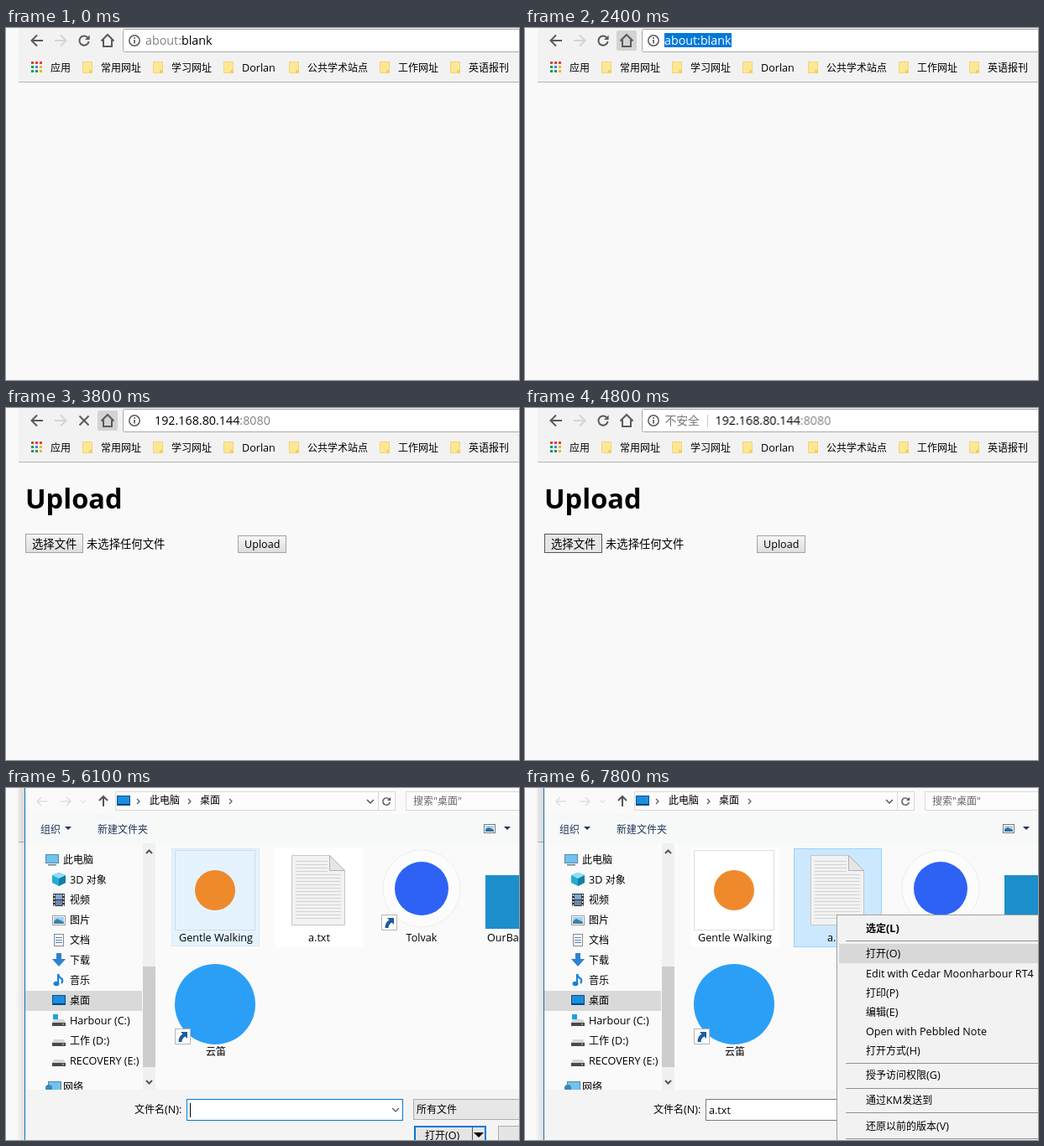
An HTML page for the animation above (8000 ms loop, 611x420 px).

```html
<!DOCTYPE html>
<html lang="zh">
<head>
<meta charset="utf-8">
<title>Upload</title>
<style>
html, body { margin: 0; width: 100%; height: 100%; overflow: hidden; background: #f9f9f9; }
svg { display: block; }
text { font-family: "Open Sans", "Noto Sans CJK SC", "Noto Sans CJK", sans-serif; white-space: pre; }
</style>
</head>
<body>
<script>
const LOOP = 8000, BLUE = '#0078d7';

// Drawing helpers, each returns SVG markup
const rect = (x, y, w, h, fill, more = '') =>
  `<rect x="${x}" y="${y}" width="${w}" height="${h}" fill="${fill}" ${more}/>`;
const box = (x, y, w, h, fill, line, more = '') =>
  rect(x + .5, y + .5, w - 1, h - 1, fill, `stroke="${line}" ${more}`);
const line = (d, color, width = 1, more = '') =>
  `<path d="${d}" fill="none" stroke="${color}" stroke-width="${width}" ${more}/>`;
const shape = (d, fill, more = '') => `<path d="${d}" fill="${fill}" ${more}/>`;
const disc = (x, y, r, fill, more = '') => `<circle cx="${x}" cy="${y}" r="${r}" fill="${fill}" ${more}/>`;
const group = (id, ...parts) => `<g id="${id}">${parts.join('')}</g>`;
// Latin runs are set slightly larger than the Chinese glyphs around them
const text = (x, y, str, size = 12, fill = '#000', more = '') =>
  `<text x="${x}" y="${y}" font-size="${size}" fill="${fill}" ${more}>` +
  str.replace(/[ -~]+/g, s => `<tspan font-size="${size * 1.05}">${s}</tspan>`) + '</text>';
const mid = 'text-anchor="middle"';
const chevron = (x, y, color, s = 4, w = 1.5) => line(`M${x - s} ${y - s / 2}l${s} ${s}l${s} ${-s}`, color, w);
const angle = (x, y) => line(`M${x - 2} ${y - 3}l3 3l-3 3`, '#555', 1.2);
const caretDown = (x, y, color = '#1e395b', s = 4) => shape(`M${x - s} ${y - s / 2}h${s * 2}l${-s} ${s}z`, color);

function arrow(x, color) {
  return line(`M${x + 7} 15h-13M${x} 8.500l-6.500 6.500l6.500 6.500`, color, 2);
}

function reload(x, y, r, color, w) {
  return line(`M${x + r * .75} ${y - r * .66}A${r} ${r} 0 1 0 ${x + r} ${y + 1}`, color, w) +
    shape(`M${x + r + 1} ${y - r - 1}v${r}h${-r}z`, color);
}

function browser() {
  const folders = [[91, '常用网址'], [175, '学习网址'], [259, 'Dorlan'],
    [337, '公共学术站点'], [445, '工作网址'], [529, '英语报刊']];
  const dots = ['#db4437', '#db4437', '#db4437', '#0f9d58', '#4285f4', '#f4b400', '#0f9d58', '#0f9d58', '#f4b400'];
  return rect(15, 0, 596, 64, '#f2f2f2') + rect(15, 64, 596, 1, '#b4b4b4') +
    group('homeHover', rect(109, 3, 24, 24, '#d3d3d3', 'rx="2"')) +
    arrow(37, '#5a5a5a') + `<g transform="matrix(-1 0 0 1 130 0)">${arrow(65, '#d4d4d4')}</g>` +
    group('reload', reload(93, 15, 5.6, '#5a5a5a', 2)) +
    group('stop', line('M87.500 9.500l11 11m0-11l-11 11', '#5a5a5a', 2)) +
    line('M113.500 15.500L121 8l7.500 7.500M116 14v8h10v-8', '#5a5a5a', 2) +
    box(139, 1, 500, 28, '#fff', '#aaa', 'rx="2"') +
    disc(153, 15, 6.2, 'none', 'stroke="#5a5a5a" stroke-width="1.500"') +
    rect(152.2, 14, 1.7, 4.5, '#5a5a5a') + rect(152.2, 11, 1.7, 1.8, '#5a5a5a') +
    dots.map((c, i) => rect(30 + i % 3 * 5, 40 + (i / 3 | 0) * 5, 3, 3, c)).join('') +
    text(53, 52, '应用') +
    folders.map(([x, name]) => box(x, 40, 12, 14, '#fee794', '#f3d477') +
      rect(x + 8, 50, 4, 4, '#f3cf63') + text(x + 22, 52, name)).join('');
}

const page = () =>
  text(23, 120, 'Upload', 31, '#000', 'font-weight="700"') +
  box(23, 150, 69, 23, 'url(#button)', '#a3a3a3') +
  group('pressed', box(23, 150, 69, 23, '#e6e6e6', '#555')) +
  text(31, 167, '选择文件', 13.33) + text(96, 167, '未选择任何文件', 13.33) +
  box(276, 152, 58, 21, 'url(#button)', '#a3a3a3') + text(284, 167, 'Upload');

function suggestions() {
  const host = '192.168.80.144:8080';
  const rows = [[host, ''], [host + '/abc', ' - Error'], [host + '/index', ' - todo list'],
    [host + '/todos', ' - todo list'], ['192.168.80.144', ' - 网页搜索']];
  const sheet = y => box(149, y - 6, 9, 12, '#fff', '#777');
  const lens = y => disc(152, y - 1, 3.5, 'none', 'stroke="#777" stroke-width="1.500"') + line(`M154.500 ${y + 1.5}l4 4`, '#777', 2);
  return rect(15, 168, 596, 9, 'url(#shadow)') + rect(15, 29, 596, 139, '#fff') +
    rect(15, 37, 596, 24, '#e8e8e8') + rect(15, 167, 596, 1, '#bbb') +
    rows.map(([link, title], i) => {
      const y = 49 + i * 24;
      return (i < 4 ? sheet : lens)(y) +
        `<text x="166" y="${y + 5}" font-size="14.300" fill="#3367d6">${link}<tspan fill="#777">${title}</tspan></text>`;
    }).join('');
}

function address() {
  const host = '192.168.80.144<tspan fill="#808080">:8080</tspan>';
  const url = `<text x="166" y="20" font-size="14.300">${host}</text>`;
  const typed = (str, rest, x) => rect(x, 6, 304 - x, 17, BLUE) + text(166, 20, str, 13.6) +
    text(x, 20, rest, 13.6, '#fff');
  return group('blank', '<text x="166" y="20" font-size="14.300"><tspan fill="#808080">about:</tspan>blank</text>') +
    group('caret', rect(246, 5, 1, 18, '#000')) +
    group('selected', rect(166, 6, 80, 17, BLUE), text(166, 20, 'about:blank', 13.6, '#fff')) +
    group('typeOne', typed('1', '92.168.80.144:8080', 174)) +
    group('typeTwo', typed('19', '2.168.80.144:8080', 182)) +
    group('chip', text(166.5, 20, '不安全', 13.8, '#777'), rect(217, 8, 1, 15, '#ccc')) +
    group('url', url);
}

function scrollbar(x, top, bottom, from, to) {
  return rect(x, top, 15, bottom - top, '#f0f0f0') + rect(x, from, 15, to - from, '#cdcdcd') +
    line(`M${x + 4} ${top + 12}l3.500-3.500l3.500 3.500M${x + 4} ${bottom - 11}l3.500 3.500l3.500-3.500`, '#555', 2);
}

const opening = () =>
  rect(28, 0, 583, 420, '#fff') + rect(28, 357, 583, 63, '#f6f7f5') + rect(27, 0, 1, 420, '#35647f') +
  scrollbar(166, 66, 357, 84, 279) + rect(156, 371, 56, 18, '#fff') + rect(217, 367, 254, 27, '#fff') +
  rect(481, 367, 130, 27, '#fff') + rect(481, 399, 90, 21, '#fff') + rect(580, 399, 31, 21, '#fff');

const screen = (x, y) => box(x, y, 16, 11, '#6fc3ef', '#5c87a3') + rect(x + 3, y + 12, 10, 1.5, '#6c7a84');

function navPane() {
  const drive = y => shape(`M57 ${y - 1}h12l2 4h-16z`, '#d6d6d6') + rect(55, y + 3, 16, 4, '#4b4b4b') +
    rect(67, y + 4, 2, 1.5, '#5fd35f');
  const sheet = (x, y) => box(x, y, 12, 15, '#fff', '#888') +
    line(`M${x + 2} ${y + 4.5}h8m-8 3h8m-8 3h8`, '#4b84b8');
  const icons = [
    y => shape(`M63 ${y - 8}l8 3v9l-8 4l-8-4v-9z`, '#25acd3') + shape(`M63 ${y - 1}l8-4v9l-8 4z`, '#157ea8') +
      shape(`M63 ${y - 8}l8 3l-8 4l-8-4z`, '#8be0f2'),
    y => rect(56, y - 7, 14, 15, '#333') + rect(59, y - 6, 8, 6, '#7fa7cf') + rect(59, y + 1, 8, 6, '#6c86b0') +
      line(`M57.500 ${y - 6}v14m11-14v14`, '#eee', 1.5, 'stroke-dasharray="2 2"'),
    y => box(55, y - 5, 16, 12, '#fff', '#999') + rect(57, y - 3, 12, 8, '#9ed0f3') +
      shape(`M57 ${y + 5}v-3l4-3l8 4v2z`, '#3f7fa5'),
    y => sheet(57, y - 7),
    y => shape(`M60 ${y - 8}h6v7h5l-8 9l-8-9h5z`, '#2f80d0'),
    y => line(`M62 ${y + 4}v-11q1 4 5 6q1 3-1 5`, '#1683d8', 2) +
      `<ellipse cx="60" cy="${y + 4.5}" rx="3.500" ry="2.800" fill="#1683d8"/>`,
    y => box(55, y - 6, 16, 12, '#1b8ee0', '#0b4f85') + rect(56, y + 4, 14, 1, '#0b3c63'),
    y => drive(y) + rect(56, y - 7, 6, 6, '#1ba1e2'), drive, drive];
  const names = ['3D 对象', '视频', '图片', '文档', '下载', '音乐', '桌面', 'Harbour (C:)', '工作 (D:)', 'RECOVERY (E:)'];
  return rect(23, 242, 139, 24, '#d9d9d9') + screen(47, 79) + text(68, 90, '此电脑') +
    names.map((s, i) => icons[i](109 + i * 24) + text(76, 114 + i * 24, s)).join('') +
    `<g clip-path="url(#pane)">${screen(50, 350)}${disc(51, 358, 4, '#3f86b5')}${text(68, 361, '网络')}</g>` +
    scrollbar(163, 66, 360, 213, 333);
}

function files() {
  const shortcut = (x, y) => box(x, y, 19, 19, '#fff', '#b5b5b5') +
    shape(`M${x + 7} ${y + 4}h8v8l-2.500-2.500q-4 2-4 6.500h-4q0-7 5-9.500z`, '#1d5b9e');
  const rules = Array.from({ length: 18 }, (_, i) => `M345 ${87.5 + i * 4}h${i < 4 ? 38 : 54}`).join('');
  return rect(197, 72, 105, 117, '#fff') +
    group('firstHover', box(197, 72, 105, 117, '#e5f3ff', '#d8eafa')) +
    box(201, 74, 96, 96, '#fff', '#dedede') + group('firstTint', box(201, 74, 96, 96, '#e5f3ff', '#d0dde6')) +
    disc(249, 122, 24, '#ef8a2c') + text(250, 183, 'Gentle Walking', 12, '#000', mid) +
    rect(320, 72, 105, 118, '#fff') +
    group('noteHover', box(320, 72, 105, 118, '#e5f3ff', '#d8eafa')) +
    group('notePick', box(320, 72, 105, 118, '#cce8ff', '#99d1ff')) +
    shape('M340.500 80.500h45l18 18v65h-63z', '#f2f2f2', 'stroke="#c6c6c6"') + line(rules, '#d2d2d2') +
    shape('M385.500 80.500v18h18z', '#e6e6e6', 'stroke="#b0b0b0"') + text(373, 183, 'a.txt', 12, '#000', mid) +
    disc(495, 120, 46, '#fcfcfc', 'stroke="#ececec"') + disc(495, 120, 32, '#2d62f5') +
    shortcut(447, 151) + text(495, 183, 'Tolvak', 12, '#000', mid) +
    rect(571, 104, 64, 64, '#1c8fcb') + text(573, 183, 'OurBarnyard') +
    disc(249, 258, 48, '#2b9ff6') + shortcut(201, 287) + text(250, 319, '云笛', 12, '#000', mid);
}

function dialog() {
  const upArrow = 'M116 22v-12M111 15l5-5l5 5';
  return rect(12, 0, 10, 420, 'url(#edge)') + rect(22, 0, 589, 420, '#fafafa') + rect(23, 31, 588, 35, '#f7f8f8') +
    line('M49 16h-12m5-5l-5 5l5 5M65 16h12m-5-5l5 5l-5 5', '#dedede', 1.5) + chevron(92, 16, '#e2e2e2', 3, 1.2) +
    line(upArrow, '#555', 2) +
    box(130, 4, 334, 23, '#fdfdfd', '#d9d9d9') + rect(443, 4, 1, 23, '#d9d9d9') +
    box(132, 9, 16, 12, '#1b8ee0', '#0b4f85') + rect(133, 19, 14, 1, '#0b3c63') +
    angle(158, 16) + text(171, 19, '此电脑') + angle(219, 16) + text(231, 19, '桌面') + angle(268, 16) +
    chevron(434, 16, '#555') + reload(453, 16, 4.2, '#555', 1.4) +
    box(476, 4, 180, 23, '#fdfdfd', '#d9d9d9') + text(485, 20, '搜索"桌面"', 12, '#666') +
    text(41, 54, '组织', 12, '#1e395b') + caretDown(74, 48) + text(109, 54, '新建文件夹', 12, '#1e395b') +
    box(569, 43, 14, 11, '#fff', '#777') + rect(571, 45, 10, 7, '#a9d3f0') +
    shape('M571 52v-3l4-2l6 3v2z', '#2f6f9f') + caretDown(597, 48) +
    group('nav', navPane()) + group('files', files()) +
    rect(23, 360, 588, 60, '#f4f4f4') + rect(22, 0, 1, 420, '#1677b8') +
    text(153, 388, '文件名(N):') +
    box(215, 371, 258, 26, '#fff', '#7a7a7a') + group('focus', box(215, 371, 258, 26, '#fff', BLUE)) +
    chevron(464, 384, '#555', 4, 1.2) +
    group('nameCaret', rect(219, 376, 1, 17, '#000')) + group('fileName', text(219, 389, 'a.txt')) +
    box(485, 371, 160, 25, '#e7e7e7', '#adadad') + text(489, 388, '所有文件') +
    rect(487, 404, 84, 30, '#e5e5e5', `stroke="${BLUE}" stroke-width="2"`) + rect(555, 405, 1, 20, '#555') +
    text(499, 419, '打开(O)') + caretDown(563, 414, '#000', 6) +
    box(586, 403, 80, 30, '#e5e5e5', '#adadad');
}

function menu() {
  const items = [[197, '打开(O)'], [221, 'Edit with Cedar Moonharbour RT4'], [244, '打印(P)'], [267, '编辑(E)'],
    [290, 'Open with Pebbled Note'], [313, '打开方式(H)'], [342, '授予访问权限(G)'], [372, '通过KM发送到'], [403, '还原以前的版本(V)']];
  return box(371, 151, 300, 300, '#f2f2f2', '#a0a0a0') +
    group('rowOne', rect(374, 156, 237, 23, '#d8d8d8')) + group('rowTwo', rect(374, 186, 237, 23, '#d8d8d8')) +
    text(406, 172, '选定(L)', 12, '#000', 'font-weight="700"') +
    items.map(([y, s]) => text(406, y + 5, s)).join('') +
    [182, 328, 358, 387, 418].map(y => rect(382, y, 229, 1, '#919191')).join('');
}

const gradient = (id, from, to, x = 0, y = 1) =>
  `<linearGradient id="${id}" x2="${x}" y2="${y}"><stop stop-color="${from}"/><stop offset="1" stop-color="${to}"/></linearGradient>`;
document.body.innerHTML = `<svg width="611" height="420" viewBox="0 0 611 420">
  <defs>${gradient('button', '#f6f6f6', '#dddddd')}${gradient('shadow', '#ccccccaa', '#cccccc00')}
  ${gradient('edge', '#00000000', '#0000001c', 1, 0)}
  <clipPath id="pane">${rect(23, 66, 140, 294, '#000')}</clipPath></defs>` +
  rect(0, 0, 611, 420, '#f9f9f9') + browser() + address() + group('page', page()) +
  group('suggest', suggestions()) + group('opening', opening()) + group('dialog', dialog()) +
  group('menu', menu()) + '</svg>';

// Each track holds [time, value] steps
const fades = {
  caret: [[0, 0], [600, 1], [1000, 0], [1500, 1], [1900, 0]],
  blank: [[0, 1], [2000, 0]],
  selected: [[0, 0], [1900, .5], [2000, 1], [2800, 0]],
  homeHover: [[0, 0], [2300, .5], [2400, 1], [4400, .7], [4500, .35], [4600, 0]],
  suggest: [[0, 0], [2800, .4], [2900, .8], [3000, 1], [3800, 0]],
  typeOne: [[0, 0], [2800, 1], [3400, 0]],
  typeTwo: [[0, 0], [3400, 1], [3800, 0]],
  stop: [[0, 0], [3800, 1], [4000, 0]],
  reload: [[0, 1], [3800, 0], [4000, 1]],
  page: [[0, 0], [3800, 1]],
  url: [[0, 0], [3800, 1]],
  chip: [[0, 0], [3900, .4], [4000, 1]],
  pressed: [[0, 0], [4800, 1]],
  opening: [[0, 0], [5700, .65], [5800, .88], [5900, 0]],
  dialog: [[0, 0], [5900, 1]],
  nav: [[0, 0], [6000, 1]],
  files: [[0, 0], [6100, 1]],
  firstHover: [[0, 1], [6300, .5], [6400, 0]],
  firstTint: [[0, 1], [6300, .5], [6400, 0]],
  noteHover: [[0, 0], [6300, .5], [6400, 1], [6600, 0]],
  notePick: [[0, 0], [6600, 1]],
  nameCaret: [[0, 1], [6300, 0], [6600, 1], [6800, 0]],
  focus: [[0, 1], [6800, .5], [6900, 0]],
  fileName: [[0, 0], [6800, .5], [6900, 1]],
  menu: [[0, 0], [7200, .5], [7300, 1]],
  rowOne: [[0, 1], [7600, .6], [7700, .2], [7800, 0]],
  rowTwo: [[0, 0], [7600, .2], [7700, .6], [7800, 1]]
};
const shifts = {
  url: [[0, 0], [3800, 11], [3900, 38], [4000, 60.5]],
  opening: [[0, 0], [5800, -3]]
};

function play(id, prop, steps, format = v => v) {
  const frames = [...steps, [LOOP, steps.at(-1)[1]]].map(([time, value]) =>
    ({ offset: time / LOOP, [prop]: format(value), easing: 'step-end' }));
  document.getElementById(id).animate(frames, { duration: LOOP, iterations: Infinity });
}
for (const id in fades) play(id, 'opacity', fades[id]);
for (const id in shifts) play(id, 'transform', shifts[id], v => `translateX(${v}px)`);
</script>
</body>
</html>
```
